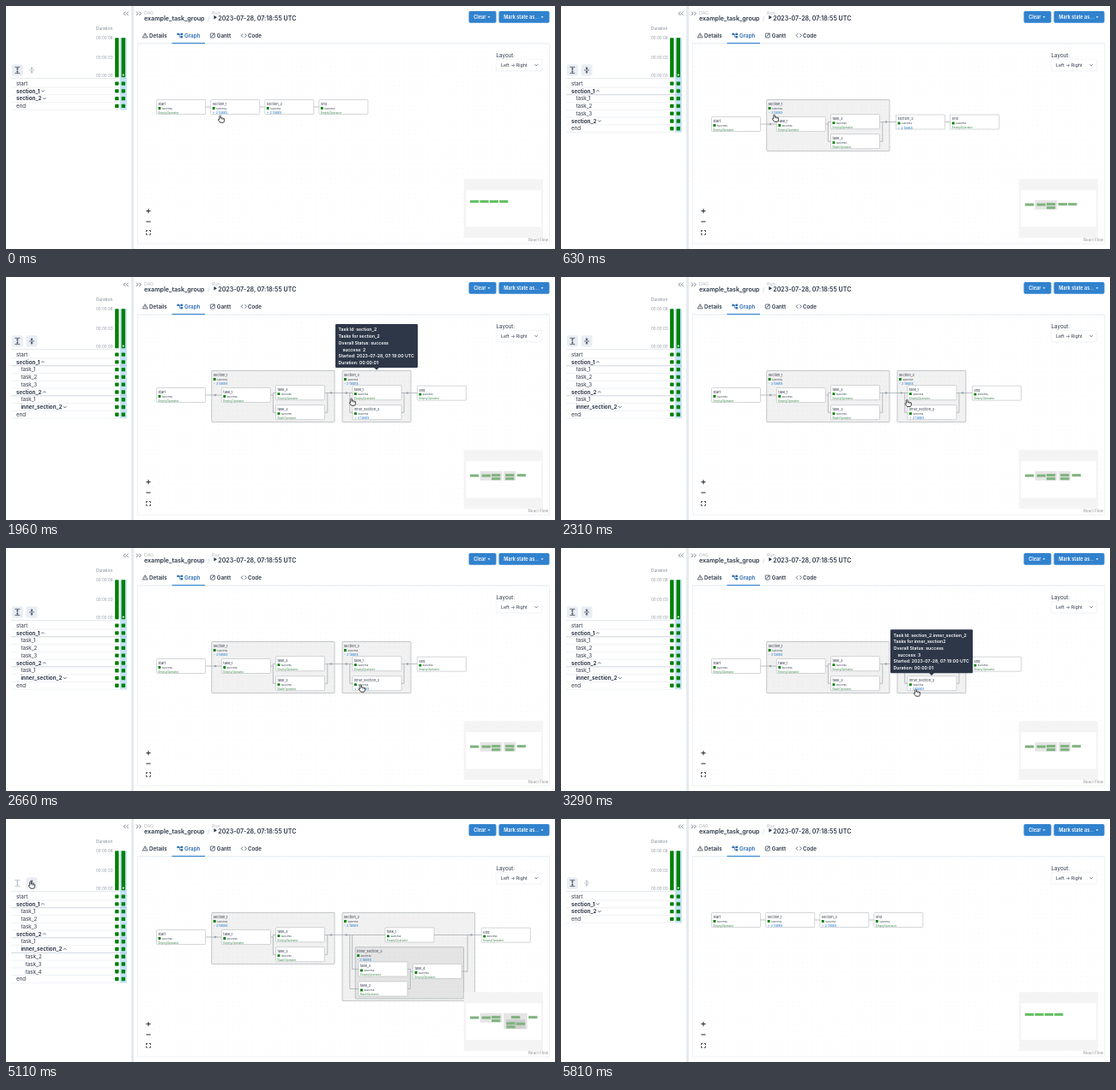
These frames come from a looping animation (640 by 284 pixels, 6.16 s). An HTML page:

```html
<!DOCTYPE html>
<html lang="en">
<head>
<meta charset="utf-8">
<title>Task groups</title>
<style>
  html, body { margin: 0; width: 100%; height: 100%; overflow: hidden; background: #fff; }
  svg { display: block; width: 640px; height: 284px; font-family: Inter, "Liberation Sans", sans-serif; }
  text { white-space: pre; }
</style>
</head>
<body>
<svg id="stage" viewBox="0 0 640 284"></svg>
<script>
const LOOP = 6160, STEP = 70;
const INK = '#2d3748', BLUE = '#2b6cb0', BTN = '#3182ce', GREEN = '#008000', EDGE = '#a0a5ab';
const stage = document.getElementById('stage');

function el(parent, tag, attrs, text) {
  const e = document.createElementNS('http://www.w3.org/2000/svg', tag);
  for (const k in attrs) e.setAttribute(k, attrs[k]);
  if (text !== undefined) e.textContent = text;
  parent.appendChild(e);
  return e;
}
const group = (parent = stage) => el(parent, 'g', {});
const rect = (p, x, y, width, height, fill, more) => el(p, 'rect', { x, y, width, height, fill, ...more });
const line = (p, d, stroke = INK, w = 0.8, more) =>
  el(p, 'path', { d, fill: 'none', stroke, 'stroke-width': w, ...more });
const shape = (p, d, fill = INK) => el(p, 'path', { d, fill });
// y is the middle of the capitals
const label = (p, x, y, size, str, fill = INK, weight = 400) =>
  el(p, 'text', { x, y: y + size * 0.36, 'font-size': size, 'font-weight': weight, fill }, str);
const show = (e, on) => e.setAttribute('display', on ? 'inline' : 'none');

/* ---------- grid on the left ---------- */
const ROW = 8.77, ROW_TOP = 86.2;
const row = (name, depth = 0, open) => ({ name, depth, open });
const tasks = (depth, ...ids) => ids.map(i => row('task_' + i, depth));
const rowsFor = s => [
  row('start'),
  row('section_1', 0, s > 0), ...(s > 0 ? tasks(1, 1, 2, 3) : []),
  row('section_2', 0, s > 1),
  ...(s > 1 ? [...tasks(1, 1), row('inner_section_2', 1, s > 2)] : []),
  ...(s > 2 ? tasks(2, 2, 3, 4) : []),
  row('end')
];

function expandButton(p, x, inward, enabled) {
  const c = enabled ? INK : '#a9b0ba', y = 75;
  if (enabled) rect(p, x - 6.5, y - 6.8, 13, 13.6, '#e9eef4', { rx: 2.4 });
  if (inward) {
    line(p, `M${x - 3} ${y}h6M${x} ${y - 4}v2.6M${x} ${y + 4}v-2.6`, c, 0.7);
    shape(p, `M${x - 1.6} ${y - 2.4}h3.2l-1.6 1.7zM${x - 1.6} ${y + 2.4}h3.2l-1.6 -1.7z`, c);
  } else {
    line(p, `M${x - 3} ${y - 3.6}h6M${x - 3} ${y + 3.6}h6M${x} ${y - 2}v4`, c, 0.7);
    shape(p, `M${x - 1.5} ${y - 1.4}h3l-1.5 -1.7zM${x - 1.5} ${y + 1.4}h3l-1.5 1.7z`, c);
  }
}

function drawGrid(p, s) {
  expandButton(p, 13.3, false, s < 3);
  expandButton(p, 30, true, s > 0);
  const rows = rowsFor(s);
  rect(p, 133, ROW_TOP - 1.5, 7.8, rows.length * ROW + 1.5, '#bee3f8');
  rows.forEach((r, i) => {
    const y = ROW_TOP + ROW * (i + 0.5), x = 12 + r.depth * 5.4, isGroup = r.open !== undefined;
    const t = label(p, x, y, 6.22, r.name, INK, isGroup ? 700 : 400);
    if (isGroup) {
      const cx = x + t.getComputedTextLength() + 3.4, d = r.open ? -1 : 1;
      line(p, `M${cx - 1.8} ${y - 0.9 * d}l1.8 ${1.8 * d}l1.8 ${-1.8 * d}`, INK, 0.7);
    }
    rect(p, 127.1, y - 2.2, 4.4, 4.4, GREEN, { rx: 0.7 });
    rect(p, 134.6, y - 2.2, 4.4, 4.4, GREEN, { rx: 0.7 });
    line(p, `M6 ${y + ROW / 2}H141`, r.open ? '#a0aec0' : '#dce2ea', 0.5);
  });
}

/* ---------- graph ---------- */
const W = 57, H = 17;
const node = (x, y, name, op, more) => ({ x, y, name, op, more, w: W, h: H });
const box = (x, y, w, h, name, more) => ({ x, y, w, h, name, more, box: true });
const EMPTY = 'EmptyOperator', BASH = 'BashOperator';
const section1 = [
  box(239.7, 109.5, 143.3, 60, 'section_1', '- 3 tasks'),
  node(251.3, 129.5, 'task_1', EMPTY),
  node(314.5, 126.7, 'task_3', EMPTY),
  node(314.5, 149.7, 'task_2', BASH)
];
const start = node(175.5, 129.5, 'start', EMPTY);
const edges1 = 'M232.5 138H251.3M308.3 138H311.4M314.5 135.5H311.4V158.3H314.5M371.5 158.3H374.8V135.5M371.5 135.5H';
const graphs = [
  {
    nodes: [
      node(175.5, 109.5, 'start', EMPTY), node(238.7, 109.5, 'section_1', '', '+ 3 tasks'),
      node(301.8, 109.5, 'section_2', '', '+ 2 tasks'), node(364.9, 109.5, 'end', EMPTY)
    ],
    edges: 'M232.5 118H238.7M295.7 118H301.8M358.8 118H364.9', joins: []
  },
  {
    nodes: [start, ...section1, node(390.6, 127, 'section_2', '', '+ 2 tasks'), node(453.8, 127, 'end', EMPTY)],
    edges: edges1 + '390.6M447.6 135.5H453.8',
    joins: [[244, 138], [379, 135.5]]
  },
  {
    nodes: [
      start, ...section1, box(392, 109.5, 80, 60, 'section_2', '- 2 tasks'),
      node(404, 126.7, 'task_1', EMPTY), node(404, 149.7, 'inner_section_2', '', '+ 3 tasks'),
      node(479.4, 127.2, 'end', EMPTY)
    ],
    edges: edges1 + '404M400.8 135.5V158.3H404M461 135.5H479.4M461 158.3H464V135.5',
    joins: [[244, 138], [379, 135.5], [396.8, 135.5], [468, 135.5]]
  },
  {
    nodes: [
      start, ...section1, box(392, 109.5, 154.6, 103, 'section_2', '- 2 tasks'),
      node(442, 126.9, 'task_1', EMPTY),
      box(407.2, 149.7, 126.4, 60.3, 'inner_section_2', '- 3 tasks'),
      node(411, 167, 'task_3', EMPTY), node(411, 190, 'task_2', BASH),
      node(474.5, 169.6, 'task_4', EMPTY), node(554.3, 127.2, 'end', EMPTY)
    ],
    edges: edges1 + '442M400.8 135.5V198.5H411M403.6 135.5V175.5H411M499 135.5H554.3' +
      'M468 175.5H471.3V178.2H474.5M468 198.5H471.3V178.2M531.5 178.2H538V135.5',
    joins: [[244, 138], [379, 135.5], [396.8, 135.5], [542.3, 135.5]]
  }
];

function drawNode(p, n) {
  rect(p, n.x, n.y, n.w, n.h, n.box ? 'rgba(90,95,100,.085)' : '#fff',
    { stroke: n.box ? '#8f949a' : '#a9adb2', 'stroke-width': 0.5, rx: 0.8 });
  const x = n.x + 2;
  label(p, x, n.y + 5, 4, n.name);
  rect(p, x, n.y + 8.5, 2.9, 2.9, GREEN, { rx: 0.4 });
  label(p, x + 4.4, n.y + 10, 3.1, 'success');
  if (n.more) label(p, x, n.y + 15.1, 4, n.more, BTN);
  else label(p, x, n.y + 14.8, 3.35, n.op, '#3c8a4c');
}

function drawGraph(p, g) {
  g.nodes.filter(n => n.box).forEach(n => drawNode(p, n));
  line(p, g.edges, EDGE, 0.7);
  g.nodes.filter(n => !n.box).forEach(n => drawNode(p, n));
  g.joins.forEach(([cx, cy]) => el(p, 'circle', { cx, cy, r: 1.3, fill: EDGE }));
}

function drawMap(p, g, s) {
  const k = 0.18, leaf = s ? '#80b37f' : '#68c166';
  g.nodes.forEach(n => rect(p, 541 + (n.x - 175.5) * k, 227 + (n.y - 109.5) * k, n.w * k, n.h * k,
    n.box ? 'rgba(0,0,0,.1)' : leaf));
}

/* ---------- fixed parts ---------- */
function drawLeft(p) {
  line(p, 'M139.4 6.6l-2.2 2.2l2.2 2.2M142.6 6.6l-2.2 2.2l2.2 2.2', '#5d6675', 0.8);
  rect(p, 146, 0, 3, 284, '#e6eaef');
  label(p, 105, 26, 4.8, 'Duration', '#7d8694');
  ['08', '03', '00'].forEach((v, i) => label(p, 105, [37, 60, 81][i], 4.5, '00:00:' + v, '#8f97a3'));
  rect(p, 133, 37, 7.8, 48, '#bee3f8');
  rect(p, 127.1, 37.3, 4.4, 46, GREEN, { rx: 0.6 });
  rect(p, 134.6, 37.3, 4.4, 46, GREEN, { rx: 0.6 });
  shape(p, 'M135.9 79.2l2.4 1.4l-2.4 1.4z', '#fff');
  line(p, 'M6 84.6H141', '#cbd2db', 0.5);
}

function button(p, x, w, str) {
  rect(p, x, 6, w, 13.8, BTN, { rx: 1.8 });
  const t = label(p, x + 5.8, 12.9, 5.5, str, '#fff', 600);
  const cx = x + 5.8 + t.getComputedTextLength() + 2.2;
  shape(p, `M${cx} 12.3h2.8l-1.4 1.6z`, '#fff');
}

function drawHeader(p) {
  line(p, 'M152 6.6l2.2 2.2l-2.2 2.2M155.2 6.6l2.2 2.2l-2.2 2.2', '#5d6675', 0.8);
  label(p, 161, 7.8, 5.3, 'DAG', '#b4bac3');
  label(p, 240, 7.8, 5.3, 'Run', '#b4bac3');
  label(p, 161, 14.5, 7.11, 'example_task_group', INK, 600);
  label(p, 235, 14.5, 7, '/', '#c3c9d1');
  shape(p, 'M242.4 11l3.6 2.3l-3.6 2.3z');
  label(p, 247.3, 14.5, 7.05, '2023-07-28, 07:18:55 UTC', INK, 600);
  button(p, 539.5, 32, 'Clear');
  button(p, 574.5, 59, 'Mark state as...');

  line(p, 'M153 43.7H634', '#e2e8f0', 0.5);
  rect(p, 193.5, 42.9, 38.5, 1.1, BTN);
  label(p, 167, 34.5, 6.22, 'Details', INK, 600);
  label(p, 208, 34.5, 6.22, 'Graph', BLUE, 600);
  label(p, 245.8, 34.5, 6.22, 'Gantt', INK, 600);
  label(p, 282, 34.5, 6.22, 'Code', INK, 600);
  line(p, 'M162.2 31.7l3 5.2h-6zM162.2 33.4v1.6M162.2 35.6v.6', INK, 0.7, { 'stroke-linejoin': 'round' });
  line(p, 'M201 33H204.6M202.6 33V36.3H204.6', BLUE, 0.7);
  [[199.4, 31.7], [203.6, 31.7], [203.6, 35]].forEach(([x, y]) => rect(p, x, y, 2.4, 2.4, BLUE));
  rect(p, 238.3, 32, 5, 5, 'none', { stroke: INK, 'stroke-width': 0.7, rx: 0.6 });
  line(p, 'M239.5 35.8l3.6 -3.8', INK, 0.9);
  line(p, 'M276.2 32.3l-2 2.2l2 2.2M278.4 32.3l2 2.2l-2 2.2', INK, 0.7);
}

function drawPane(p) {
  const dots = el(el(p, 'defs', {}), 'pattern',
    { id: 'dots', width: 5.7, height: 5.7, patternUnits: 'userSpaceOnUse' });
  el(dots, 'circle', { cx: 2.4, cy: 2.4, r: 0.24, fill: '#91919a', opacity: 0.6 });
  rect(p, 153.4, 44, 480.2, 234, 'url(#dots)', { stroke: '#e2e8f0', 'stroke-width': 0.6 });
}

function drawTools(p) {
  label(p, 571.6, 57.5, 6.22, 'Layout:');
  rect(p, 571.3, 62.2, 53.5, 13.6, '#fff', { rx: 1.8, stroke: '#e2e8f0', 'stroke-width': 0.5 });
  label(p, 577, 69, 5.33, 'Left -> Right');
  line(p, 'M616.5 68.2l1.6 1.6l1.6 -1.6', INK, 0.7);

  rect(p, 160, 233, 12, 38, '#fff');
  line(p, 'M160 245.7h12M160 258.3h12', '#eee', 0.5);
  line(p, 'M163.4 239.6h5.2M166 237v5.2M163.4 252h5.2', '#111', 0.9);
  line(p, 'M163.5 264v-1.5h1.6M166.9 262.5h1.6v1.5M168.5 265.6v1.5h-1.6M165.1 267.1h-1.6v-1.5', '#111', 0.8);
  label(p, 609, 273.7, 4.45, 'React Flow', '#8f8f8f');

  rect(p, 533.8, 202.3, 92.2, 68.6, '#f4f4f4');
  rect(p, 536.2, 215.2, 87.6, 42.8, '#fff');
}

/* ---------- tooltips ---------- */
function tooltip(cx, tip, id, name, count) {
  const g = group(), top = tip - 54, x = cx - 48;
  rect(g, x, top, 96, 51, INK, { rx: 1.2 });
  shape(g, `M${cx - 3} ${tip - 3.2}h6l-3 3z`);
  ['Task Id: ' + id, 'Tasks for ' + name, 'Overall Status: success', 'success: ' + count,
    'Started: 2023-07-28, 07:19:00 UTC', 'Duration: 00:00:01'].forEach((s, i) =>
    label(g, x + (i === 3 ? 8.4 : 3.6), top + 6.5 + i * 7.72, 5.15, s, '#fff', 600));
  return g;
}

/* ---------- cursors, drawn around their middle ---------- */
function cursorArt(d, extra) {
  const g = group();
  el(g, 'path', { d, fill: '#fff', stroke: '#111', 'stroke-width': 0.8, 'stroke-linejoin': 'round' });
  if (extra) line(g, extra, '#111', 0.5);
  return g;
}

/* ---------- build ---------- */
drawPane(group());
drawLeft(group());
drawHeader(group());
const layers = [[], [], [], []];
const layer = draw => layers.forEach((list, s) => {
  const g = group();
  draw(g, s);
  list.push(g);
});
layer((g, s) => drawGrid(g, s));
layer((g, s) => drawGraph(g, graphs[s]));
drawTools(group());
layer((g, s) => drawMap(g, graphs[s], s));

const inner = ['section_2.inner_section_2', 'inner_section2', 3];
const tips = [
  [1470, 1680, tooltip(419, 127, 'section_2', 'section_2', 2)],
  [1680, 2310, tooltip(432, 109, 'section_2', 'section_2', 2)],
  [2870, 3360, tooltip(432, 149.2, ...inner)],
  [3360, 3500, tooltip(470.4, 149.2, ...inner)]
];

const cursors = {
  point: cursorArt('M-2.2 .6V-3.4q.8 -1.3 1.6 0V-.9q.9 -.7 1.5 .1q.9 -.6 1.4 .2q1.1 -.4 1.3 .7V1.6q-.2 1.6 -1.1 2.6H-1.2L-3.6 1.2q-.1 -1.1 1.4 -.6z',
    'M.9 -.6v1.4M2.3 -.3v1.2'),
  grab: cursorArt('M-2.4 .4L-3 -1.8q.4 -1.1 1.3 -.3q.1 -1.9 1.4 -1.2q1 -.9 1.6 .3q1.3 -.4 1.4 .8q1.1 0 .9 1.3L3 2q-.4 1.2 -1.2 2.2H-1.2L-3.4 1.4q-.1 -1 1 -1z',
    'M-1.4 -2v1.7M.2 -2.6v2.2M1.7 -2.1v1.8'),
  arrow: cursorArt('M-2.5 -4V3l1.6 -1.5l1.1 2.5l1.1 -.5l-1.1 -2.4h2.3z')
};

/* ---------- time ---------- */
const stateAt = [[0, 0], [350, 1], [1680, 2], [3360, 3], [5320, 0]];
const path = [
  [0, 251, 132], [70, 250, 131], [980, 250, 131], [1330, 420, 140], [1540, 404, 146],
  [2240, 404, 146], [2660, 415, 164], [2800, 415, 169], [3500, 415, 169], [3920, 211, 196],
  [4200, 211, 196], [4760, 44, 86], [5040, 30, 77], [5250, 30, 77], [5670, 58, 294], [LOOP, 58, 294]
];
const looks = [[0, 'point'], [3570, 'grab'], [4480, 'arrow'], [4900, 'point'], [5390, 'arrow']];
const last = (table, t) => table.filter(r => r[0] <= t).pop()[1];

function place(t) {
  const i = path.findIndex(k => k[0] > t), [t0, x0, y0] = path[i - 1], [t1, x1, y1] = path[i];
  const u = (t - t0) / (t1 - t0), e = u * u * (3 - 2 * u);
  return [x0 + (x1 - x0) * e, y0 + (y1 - y0) * e];
}

function frame() {
  const t = Math.floor(performance.now() % LOOP / STEP) * STEP;
  const s = last(stateAt, t), look = last(looks, t), [x, y] = place(t);
  layers.forEach((list, i) => list.forEach(g => show(g, i === s)));
  tips.forEach(([from, to, g]) => show(g, t >= from && t < to));
  for (const k in cursors) {
    show(cursors[k], k === look);
    cursors[k].setAttribute('transform', `translate(${x} ${y})`);
  }
  requestAnimationFrame(frame);
}
frame();
</script>
</body>
</html>
```
